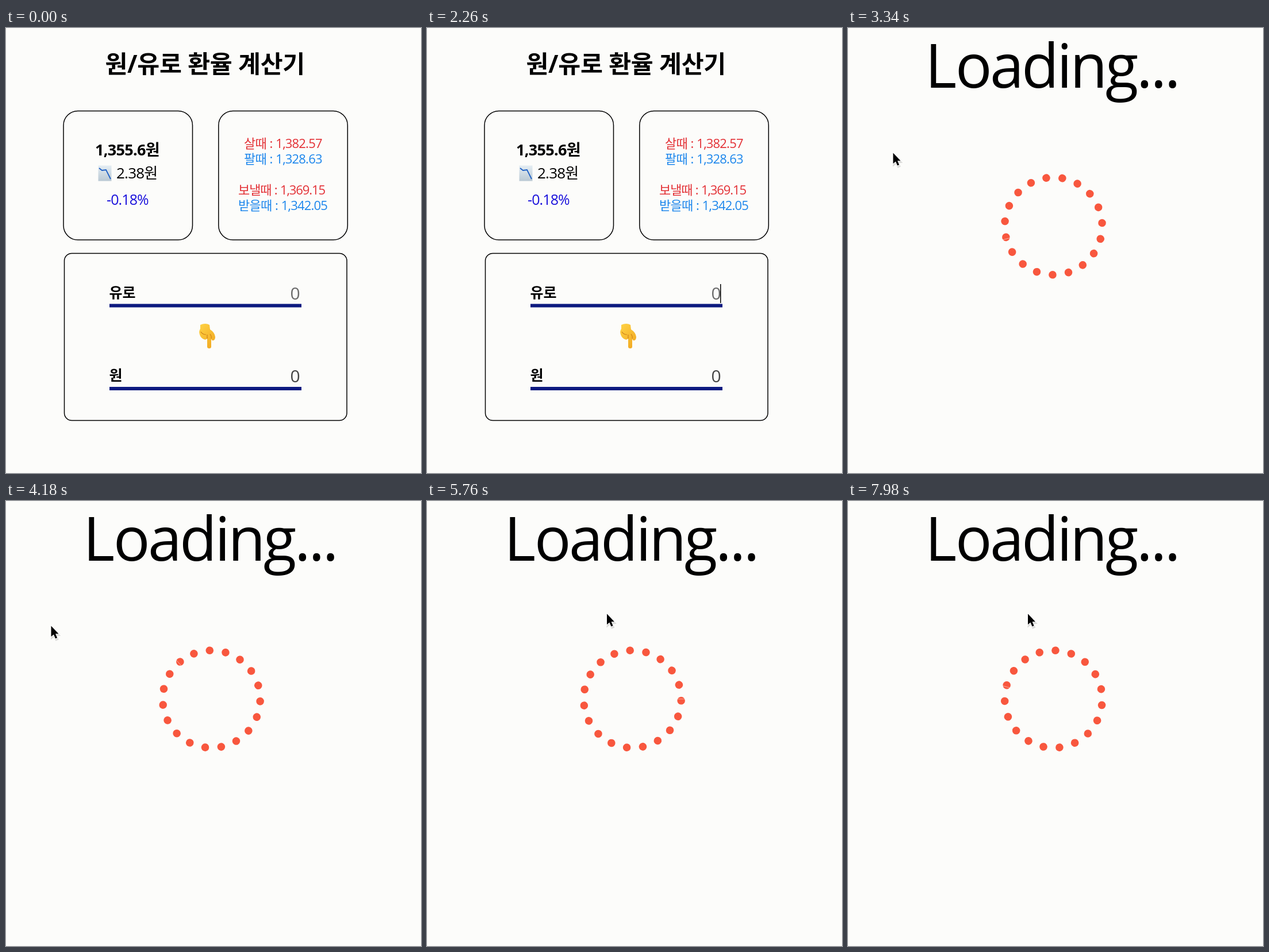
An HTML page for the animation above (8 s loop, 722x775 px).

```html
<!DOCTYPE html>
<html lang="ko">
<head>
<meta charset="utf-8">
<title>환율 계산기</title>
<style>
  html, body { margin: 0; width: 100%; height: 100%; overflow: hidden; background: #fcfcfa; }
  svg { display: block; width: 722px; height: 775px; }
  text { font-family: "Open Sans", "Noto Sans CJK KR", "Noto Sans CJK", sans-serif; white-space: pre; }
  .bold { font-weight: 700; }
  .frame { fill: none; stroke: #000; stroke-width: 1.5; }
  .rate { font-size: 22px; letter-spacing: -.8px; word-spacing: .8px; font-weight: 500; }
  .buy { fill: #e33035; }
  .sell { fill: #1c86ec; }
  .label { font-size: 25px; font-weight: 700; }
  .value { font-size: 30px; }
  .line { fill: #0d1a80; }
</style>
</head>
<body>
<svg viewBox="0 0 722 775">
  <defs>
    <linearGradient id="skin" x2=".7" y2="1">
      <stop stop-color="#ffd344"/><stop offset="1" stop-color="#f2ab24"/>
    </linearGradient>
    <linearGradient id="chart" x2="0" y2="1">
      <stop stop-color="#e4edf3"/><stop offset="1" stop-color="#b9c8d3"/>
    </linearGradient>
  </defs>

  <g id="calculator">
    <text class="bold" x="172.5" y="78" font-size="42.3" letter-spacing="-.3">원/유로 환율 계산기</text>

    <rect class="frame" x="100" y="144.5" width="224.5" height="224.5" rx="25"/>
    <text class="bold" x="155" y="222" font-size="27" letter-spacing="-.7">1,355.6원</text>
    <rect x="160.5" y="239.5" width="23" height="27" fill="url(#chart)"/>
    <path d="M162 244l5 4 7-1 8 16" fill="none" stroke="#1d5fc4" stroke-width="1.8"/>
    <text x="192" y="261.5" font-size="26" letter-spacing="-.8" font-weight="500">2.38원</text>
    <text x="175" y="308" font-size="25" letter-spacing="-.9" fill="#1b12dc">-0.18%</text>

    <rect class="frame" x="369.8" y="144.5" width="224.5" height="224.5" rx="25"/>
    <text class="rate buy" x="414" y="209">살때 : 1,382.57</text>
    <text class="rate sell" x="414" y="236">팔때 : 1,328.63</text>
    <text class="rate buy" x="404" y="290" style="letter-spacing:-1.1px">보낼때 : 1,369.15</text>
    <text class="rate sell" x="404" y="317">받을때 : 1,342.05</text>

    <rect class="frame" x="101.5" y="392.5" width="491.5" height="291" rx="13"/>
    <text class="label" x="179.5" y="470">유로</text>
    <text class="value" x="494.5" y="473" fill="#6b6b6b">0</text>
    <rect class="line" x="180" y="480.5" width="334" height="6"/>
    <rect id="caret" x="510" y="446" width="1.5" height="33"/>

    <path d="M338 517q9-4 16 0l1 8q8 5 9 13 0 5-3 6-3 1-4-3v14q0 3-3.500 3t-3.500-3v-14q-3 3-6 1-5-2-7-8-2-6 1-10z" fill="url(#skin)"/>
    <path d="M339 529q3 5 9 5M350 541v-7M357 541q1-4-2-8" fill="none" stroke="#cf8319" stroke-width="1.2"/>

    <text class="label" x="179.5" y="614">원</text>
    <text class="value" x="494.5" y="617" fill="#444">0</text>
    <rect class="line" x="180" y="625" width="334" height="6"/>
  </g>

  <g id="loading">
    <text x="134" y="104" dx="0 1.5" font-size="106" letter-spacing="-3.8">Loading...</text>
    <g id="spinner" fill="#f8573e"></g>
    <g id="pointer">
      <path d="M0 0V20L4.600 16 8 23 11.500 21.500 8.300 14.500H14Z" opacity=".12" transform="translate(.5 2)" stroke="#000" stroke-width="2"/>
      <path d="M0 0V18.800L4.400 15 7.500 22 10.600 20.700 7.600 13.700H13Z" stroke="#fff" stroke-width="1.8" paint-order="stroke"/>
    </g>
  </g>
</svg>
<script>
const LOOP = 8000, LOADING_AT = 2380, CARET_AT = 1200, POINTER_AT = 2920;
const CENTER = [357.4, 345], RADIUS = 84.8, DOTS = 19;
const byId = id => document.getElementById(id);
const show = (id, visible) => byId(id).style.display = visible ? '' : 'none';

// [step, degrees]: the dotted ring turns unevenly
const TURN = [[50, 92], [71, 166.8], [89, 230], [124, 361.9], [149, 502.1], [171, 556.6]];

// Pictures advance three times every 140 ms: at 0, 20 and 120 ms
function stepAt(t) {
  const phase = t % 140;
  return Math.floor(t / 140) * 3 + (phase >= 20) + (phase >= 120);
}

function turnAt(step) {
  let i = 1;
  while (i < TURN.length - 1 && step > TURN[i][0]) i++;
  const [s0, a0] = TURN[i - 1], [s1, a1] = TURN[i];
  return a0 + (a1 - a0) * (step - s0) / (s1 - s0);
}

// The first dot carries the hairline seam of the ring
let ring = '';
for (let i = 0; i < DOTS; i++)
  ring += `<circle cx="${RADIUS}" r="6.8" transform="rotate(${i * 360 / DOTS})"/>`;
byId('spinner').innerHTML = ring +
  '<path d="M78 0h14" transform="rotate(-2)" stroke="#fcfcfa" stroke-width=".7" opacity=".7"/>';

function draw(t) {
  const step = stepAt(t);
  show('calculator', t < LOADING_AT);
  show('loading', t >= LOADING_AT);
  show('caret', t >= CARET_AT);
  show('pointer', t >= POINTER_AT);

  byId('spinner').setAttribute('transform', `translate(${CENTER}) rotate(${turnAt(step)})`);

  const u = Math.min(1, Math.max(0, (step - 110) / 12));
  const eased = u * u * (3 - 2 * u);
  byId('pointer').setAttribute('transform', `translate(${78.5 + 234.5 * eased} ${217.5 - 21 * eased})`);
}

const start = performance.now();
function tick() {
  draw((performance.now() - start) % LOOP);
  requestAnimationFrame(tick);
}
tick();
</script>
</body>
</html>
```
